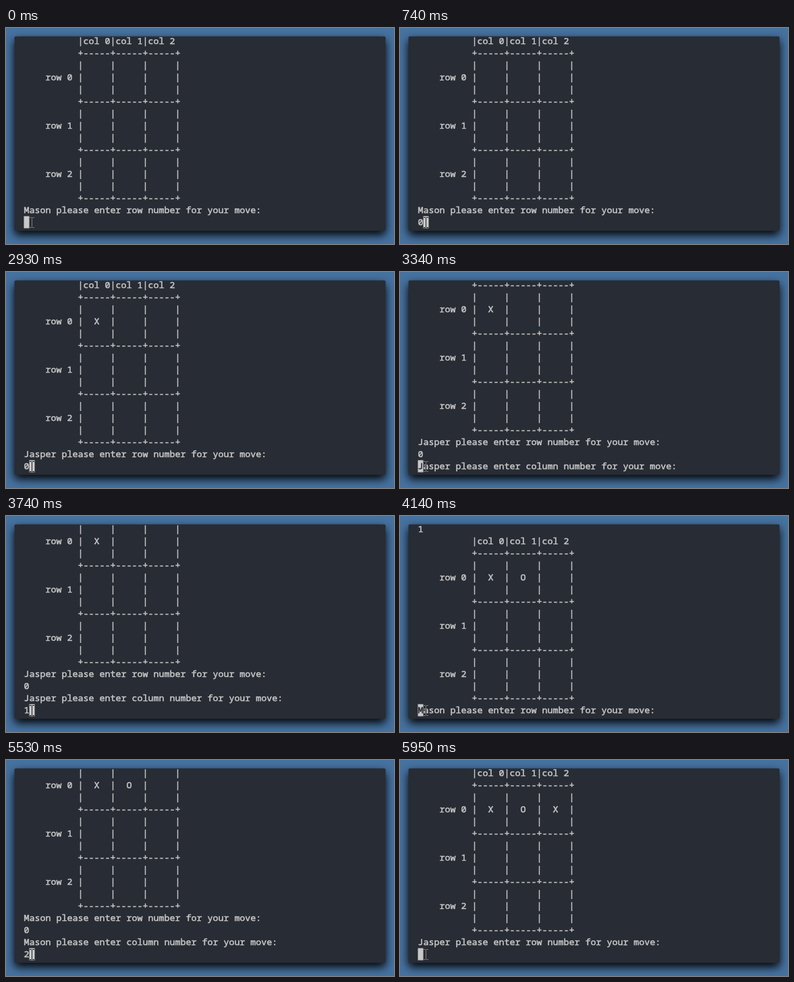
These frames come from a looping animation (575 px wide and 322 px high, 6.15 s). An HTML page with a canvas:

```html
<!DOCTYPE html>
<html lang="en">
<head>
<meta charset="utf-8">
<title>Tic-tac-toe in a terminal</title>
<style>
  html, body { margin: 0; width: 100%; height: 100%; overflow: hidden; background: #4672a0; }
  canvas { display: block; }
</style>
</head>
<body>
<canvas width="575" height="322"></canvas>
<script>
const LOOP = 6150, ROWS = 16, LINE = 18, CHAR = 8, LEFT = 26.5, TOP = 10.5, BASELINE = 13.5;
const INK = '#c8c8c8', PAPER = '#282c34';
const ctx = document.querySelector('canvas').getContext('2d');

const cells = Array.from({ length: 3 }, () => [' ', ' ', ' ']);
const log = [], screens = [];

const snap = (time, cursor) => screens.push({ time, cursor, lines: log.slice(-ROWS) });

function printBoard() {
  const pad = ' '.repeat(10);
  const border = pad + '+-----+-----+-----+';
  const gap = pad + '|     |     |     |';
  log.push(pad + '|col 0|col 1|col 2', border);
  cells.forEach((row, i) => {
    const marks = row.map(mark => `  ${mark}  |`).join('');
    log.push(gap, `    row ${i} |${marks}`, gap, border);
  });
}

// The prompt appears at `shown`, its line break at `ready`, the answer at `typed`.
function ask(name, what, shown, ready, typed, answer) {
  log.push(`${name} please enter ${what} number for your move:`);
  if (shown < ready) snap(shown, 0);
  log.push('');
  snap(ready, 0);
  if (typed === undefined) return;
  log[log.length - 1] = String(answer);
  snap(typed, 1);
}

function place(mark, row, col) {
  cells[row][col] = mark;
  printBoard();
}

const first = 'Mason', second = 'Jasper';
printBoard();
ask(first, 'row', 0, 0, 740, 0);
ask(first, 'column', 1140, 1140, 1540, 0);
place('X', 0, 0);
ask(second, 'row', 2000, 2000, 2930, 0);
ask(second, 'column', 3340, 3410, 3740, 1);
place('O', 0, 1);
ask(first, 'row', 4140, 4210, 4870, 0);
ask(first, 'column', 5140, 5140, 5530, 2);
place('X', 0, 2);
ask(second, 'row', 5880, 5950);

function drawWindow() {
  ctx.clearRect(0, 0, 575, 322);
  ctx.beginPath();
  ctx.roundRect(12.5, 12.5, 550, 290, 2);
  ctx.shadowColor = '#000';
  ctx.shadowBlur = 14;
  ctx.shadowOffsetY = 6;
  ctx.fillStyle = PAPER;
  ctx.fill();
  ctx.shadowColor = 'transparent';
  ctx.clip();
}

// A thin outline gives the text its medium weight.
function write(text, x, y, color) {
  ctx.fillStyle = ctx.strokeStyle = color;
  ctx.fillText(text, x, y + BASELINE);
  ctx.strokeText(text, x, y + BASELINE);
}

function drawPointer() {
  ctx.globalCompositeOperation = 'difference';
  ctx.fillStyle = '#a8a8a8';
  ctx.fillRect(38, 283, 1, 14);
  for (const y of [282, 297]) {
    ctx.fillRect(35, y, 3, 1);
    ctx.fillRect(39, y, 3, 1);
  }
}

function draw({ lines, cursor }) {
  ctx.save();
  drawWindow();
  ctx.font = '13.333px "Noto Sans Mono", "DejaVu Sans Mono", monospace';
  ctx.lineWidth = 0.5;
  ctx.lineJoin = 'round';
  lines.forEach((line, i) => write(line, LEFT, TOP + i * LINE, INK));

  const x = LEFT + cursor * CHAR, y = TOP + (ROWS - 1) * LINE;
  ctx.fillStyle = INK;
  ctx.fillRect(x, y, CHAR, LINE);
  write(lines[ROWS - 1][cursor] || '', x, y, PAPER);
  drawPointer();
  ctx.restore();
}

function frame() {
  const time = performance.now() % LOOP;
  draw(screens.filter(s => s.time <= time).pop());
  requestAnimationFrame(frame);
}
frame();
</script>
</body>
</html>
```
